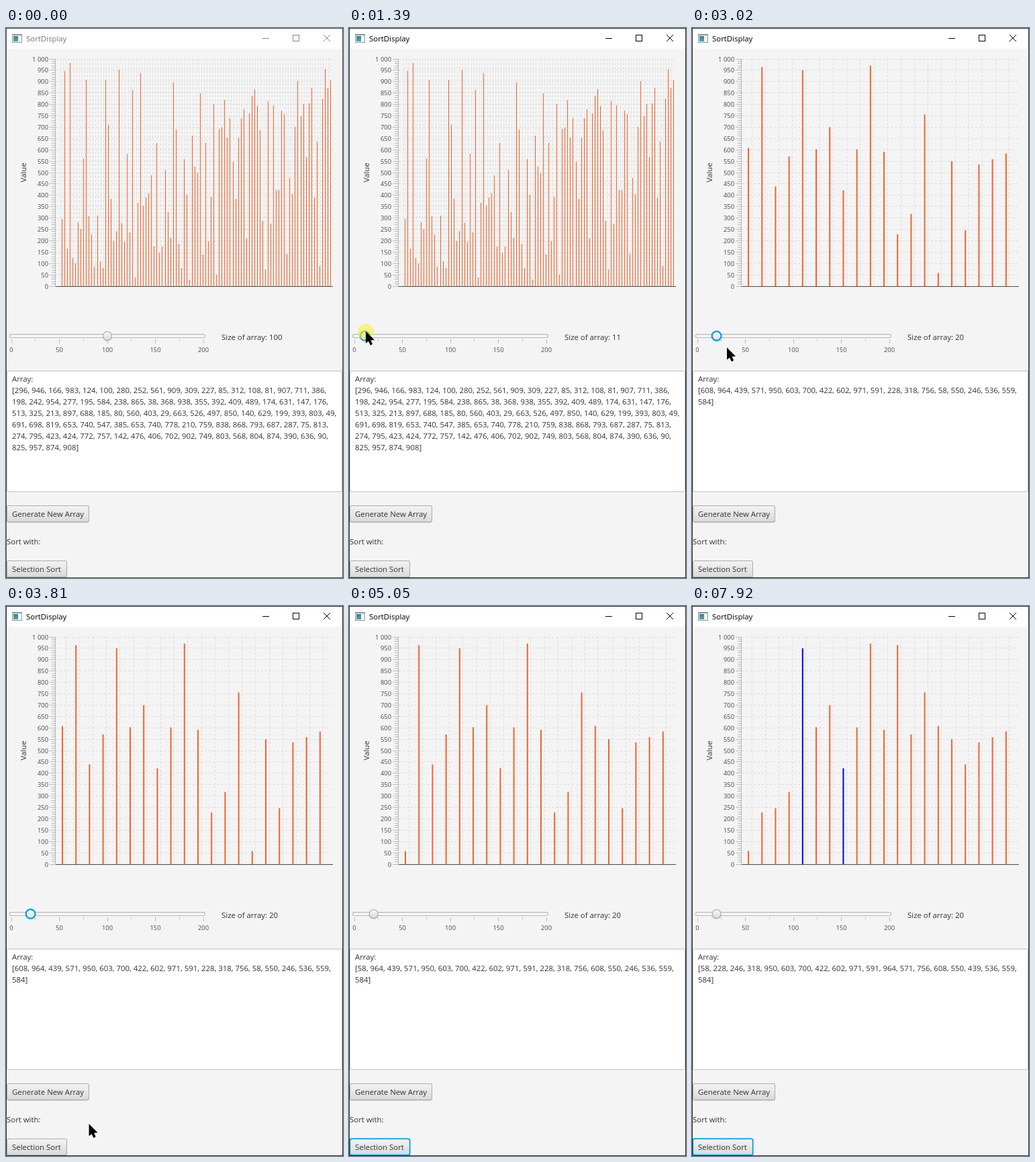
Write an HTML page with a canvas that moves like this. It is 502 px wide and 818 px high and loops after 8000 ms.

```html
<!DOCTYPE html>
<html lang="en">
<head>
<meta charset="utf-8">
<title>SortDisplay</title>
<style>
  html, body { margin: 0; width: 100%; height: 100%; overflow: hidden; background: #f4f4f4; }
  canvas { display: block; }
</style>
</head>
<body>
<canvas id="stage" width="502" height="818"></canvas>
<script>
const ctx = document.getElementById('stage').getContext('2d');
const LOOP = 8000, STEP = 78.1;
const ORANGE = '#f3622d', BLUE = '#0000ee', FOCUS = '#039ed3', INK = '#333';
const PRESS = 680, RELEASE = 2700, GENERATE = 2785, SORT_PRESS = 4505, SORT_RELEASE = 4650;
const CURSOR_IN = 70, CURSOR_OUT = 5045;

const largeArray = [
  296, 946, 166, 983, 124, 100, 280, 252, 561, 909, 309, 227, 85, 312, 108, 81, 907, 711, 386,
  198, 242, 954, 277, 195, 584, 238, 865, 38, 368, 938, 355, 392, 409, 489, 174, 631, 147, 176,
  513, 325, 213, 897, 688, 185, 80, 560, 403, 29, 663, 526, 497, 850, 140, 629, 199, 393, 803, 49,
  691, 698, 819, 653, 740, 547, 385, 653, 740, 778, 210, 759, 838, 868, 793, 687, 287, 75, 813,
  274, 795, 423, 424, 772, 757, 142, 476, 406, 702, 902, 749, 803, 568, 804, 874, 390, 636, 90,
  825, 957, 874, 908];
const smallArray = [608, 964, 439, 571, 950, 603, 700, 422, 602, 971, 591, 228, 318, 756,
  58, 550, 246, 536, 559, 584];

// Selection sort passes: time of highlight, swap and end of highlight
const passes = [
  [4580, 4815, 5045], [5435, 5665, 5895], [6285, 6515, 6675], [7065, 7305, 7535], [7915, 8100, 8200]];

// Key poses: time, then values
const cursorPath = [
  [56, 390, 797], [446, 151, 468], [602, 151, 468], [680, 151, 458], [1382, 25, 451], [1538, 21, 451],
  [1928, 21, 451], [2396, 37, 455], [2865, 37, 455], [3200, 100, 540], [3560, 178, 690],
  [3722, 145, 759], [3802, 124, 770], [4115, 60, 793], [4890, 60, 793], [5050, 52, 818]];
const sizePath = [[680, 100], [1382, 11], [1538, 9], [1928, 9], [2396, 20]];

function pose(path, t) {
  if (t <= path[0][0]) return path[0].slice(1);
  const i = path.findIndex(key => key[0] > t);
  if (i < 0) return path[path.length - 1].slice(1);
  const a = path[i - 1], b = path[i], u = (t - a[0]) / (b[0] - a[0]);
  return a.slice(1).map((v, k) => v + (b[k + 1] - v) * u);
}

function sortState(t) {
  const values = smallArray.slice();
  let marked = [];
  passes.forEach(([mark, swap, end], i) => {
    if (t < mark) return;
    const j = values.indexOf(Math.min(...values.slice(i)));
    if (t < end) marked = [i, j];
    if (t >= swap) [values[i], values[j]] = [values[j], values[i]];
  });
  return { values, marked };
}

function rect(x, y, w, h, fill) {
  ctx.fillStyle = fill;
  ctx.fillRect(x, y, w, h);
}

function roundRect(x, y, w, h, r, fill) {
  ctx.fillStyle = fill;
  ctx.beginPath();
  ctx.roundRect(x, y, w, h, r);
  ctx.fill();
}

function disc(x, y, r, fill) {
  ctx.fillStyle = fill;
  ctx.beginPath();
  ctx.arc(x, y, r, 0, 7);
  ctx.fill();
}

function line(color, ...points) {
  ctx.strokeStyle = color;
  ctx.lineWidth = 1;
  ctx.beginPath();
  for (let i = 0; i < points.length; i += 4) {
    ctx.moveTo(points[i], points[i + 1]);
    ctx.lineTo(points[i + 2], points[i + 3]);
  }
  ctx.stroke();
}

function text(str, x, y, { size = 11.4, align = 'left', color = INK } = {}) {
  ctx.font = `${size}px "Open Sans", "Noto Sans", sans-serif`;
  ctx.textAlign = align;
  ctx.fillStyle = color;
  ctx.fillText(str, x, y);
}

function shade(y, h, top, bottom) {
  const g = ctx.createLinearGradient(0, y, 0, y + h);
  g.addColorStop(0, top);
  g.addColorStop(1, bottom);
  return g;
}

function drawWindow(active) {
  rect(0, 0, 502, 818, '#f4f4f4');
  rect(0, 0, 502, 31, '#fff');
  rect(9, 9, 15, 13, '#8d979c');
  rect(10, 11, 13, 10, '#f2f5f6');
  rect(11, 12, 7, 8, shade(12, 8, '#3f7f9d', '#5ba596'));
  text('SortDisplay', 30, 20, { color: active ? '#000' : '#777' });
  const ink = active ? '#000' : '#888';
  line(ink, 382, 15.5, 392, 15.5);
  ctx.strokeRect(427.5, 10.5, 9, 9);
  line(ink, 473, 10, 483, 20, 483, 10, 473, 20);
}

function drawChart(values, marked) {
  const n = values.length, gap = 404 / n;
  const yOf = v => 384 - v * 0.338;

  ctx.setLineDash([3, 3]);
  for (let i = 0; i < n; i++) {
    const x = Math.floor(79 + (i + 0.5) * gap) + 0.5;
    line('#dcdcdc', x, 46, x, 384);
  }
  for (let v = 50; v <= 1000; v += 50) {
    const y = Math.floor(yOf(v)) + 0.5;
    line('#dcdcdc', 74, y, 487, y);
  }
  ctx.setLineDash([]);

  for (let v = 0; v <= 1000; v += 10) {
    const y = Math.floor(yOf(v)) + 0.5, major = v % 50 === 0;
    line('#bcbcbc', major ? 65 : 68, y, 73, y);
    if (major) text(v === 1000 ? '1 000' : v, 63, y + 3.5, { size: 9.4, align: 'right', color: '#4a4a4a' });
  }
  line('#b5b5b5', 73.5, 46, 73.5, 385);

  values.forEach((v, i) => {
    const x = 83 + i * gap, y = yOf(v);
    const color = marked.includes(i) ? BLUE : ORANGE;
    if (n > 50) rect(Math.round(x), Math.round(y), 1, 384 - Math.round(y), color);
    else rect(x, y, 2, 384 - y, color);
  });
  line('#4d4d4d', 74, 384.5, 487, 384.5);

  ctx.save();
  ctx.translate(30, 215);
  ctx.rotate(-Math.PI / 2);
  text('Value', 0, 0, { align: 'center' });
  ctx.restore();
}

function drawSlider(size, focused) {
  const xOf = v => 8 + v * 1.43;
  roundRect(5, 455, 292, 6, 3, '#b4b4b4');
  roundRect(6, 456, 290, 4, 2, shade(456, 4, '#ededed', '#fcfcfc'));
  for (let v = 0; v <= 200; v += 25) {
    const x = Math.floor(xOf(v)) + 0.5, major = v % 50 === 0;
    line('#bcbcbc', x, 463, x, major ? 469 : 466);
    if (major) text(v, xOf(v), 482, { size: 9.4, align: 'center', color: '#4a4a4a' });
  }
  const x = xOf(size);
  if (focused) {
    disc(x, 458, 8.6, 'rgba(3,158,211,.25)');
    disc(x, 458, 7.8, FOCUS);
    disc(x, 458, 5.8, shade(451, 14, '#fafafa', '#dedede'));
  } else {
    disc(x, 459, 7.3, 'rgba(0,0,0,.1)');
    disc(x, 458, 7, '#a6a6a6');
    disc(x, 458, 6, shade(451, 14, '#fafafa', '#d8d8d8'));
  }
  text('Size of array: ' + Math.round(size), 321, 464);
}

function drawTextArea(values) {
  roundRect(1, 509.5, 500, 180.5, 2, '#c4c4c4');
  roundRect(2, 510.5, 498, 178.5, 1, '#fff');
  rect(2, 510, 498, 2, shade(510, 2, '#d8d8d8', '#f8f8f8'));
  text('Array:', 9, 526);
  const rows = `[${values.join(', ')}]`.match(/.{1,97}(?:\s|$)/g);
  rows.forEach((row, i) => text(row.trim(), 9, 543 + i * 17));
}

function drawButton(label, y, w, focused) {
  if (focused) roundRect(0.5, y - 0.6, w + 1, 26.2, 3.5, FOCUS);
  else roundRect(1, y, w, 25.5, 3, '#acacac');
  const inset = focused ? 1.2 : 1;
  roundRect(1 + inset, y + inset, w - 2 * inset, 25 - 2 * inset, 2, shade(y, 25, '#f4f4f4', '#d9d9d9'));
  text(label, 9, y + 17);
}

function drawCursor(x, y, pressed) {
  if (pressed) disc(x, y + 1, 12, 'rgba(248,240,40,.55)');
  ctx.fillStyle = '#000';
  ctx.beginPath();
  [[0, 0], [0, 18], [4, 15], [7, 21], [10, 19], [7.5, 13.5], [13, 13]]
    .forEach(([dx, dy]) => ctx.lineTo(x + dx, y + dy));
  ctx.fill();
}

function draw(t) {
  const stepped = PRESS + Math.floor((t - PRESS) / STEP + 0.02) * STEP;
  const active = t >= PRESS, sorting = t >= SORT_PRESS;
  const { values, marked } = t < GENERATE ? { values: largeArray, marked: [] } : sortState(t);

  drawWindow(active);
  drawChart(values, marked);
  drawSlider(pose(sizePath, stepped)[0], active && !sorting);
  drawTextArea(values);
  drawButton('Generate New Array', 710, 123, false);
  text('Sort with:', 1, 768);
  drawButton('Selection Sort', 792, 90, sorting);
  if (t >= CURSOR_IN && t < CURSOR_OUT) {
    const pressed = (active && t < RELEASE) || (sorting && t < SORT_RELEASE);
    drawCursor(...pose(cursorPath, stepped), pressed);
  }
  ctx.lineWidth = 1;
  ctx.strokeStyle = active ? '#2b2b2b' : '#4a4a4a';
  ctx.strokeRect(0.5, 0.5, 501, 817);
}

const start = performance.now();
function tick() {
  draw((performance.now() - start) % LOOP);
  requestAnimationFrame(tick);
}
tick();
</script>
</body>
</html>
```
